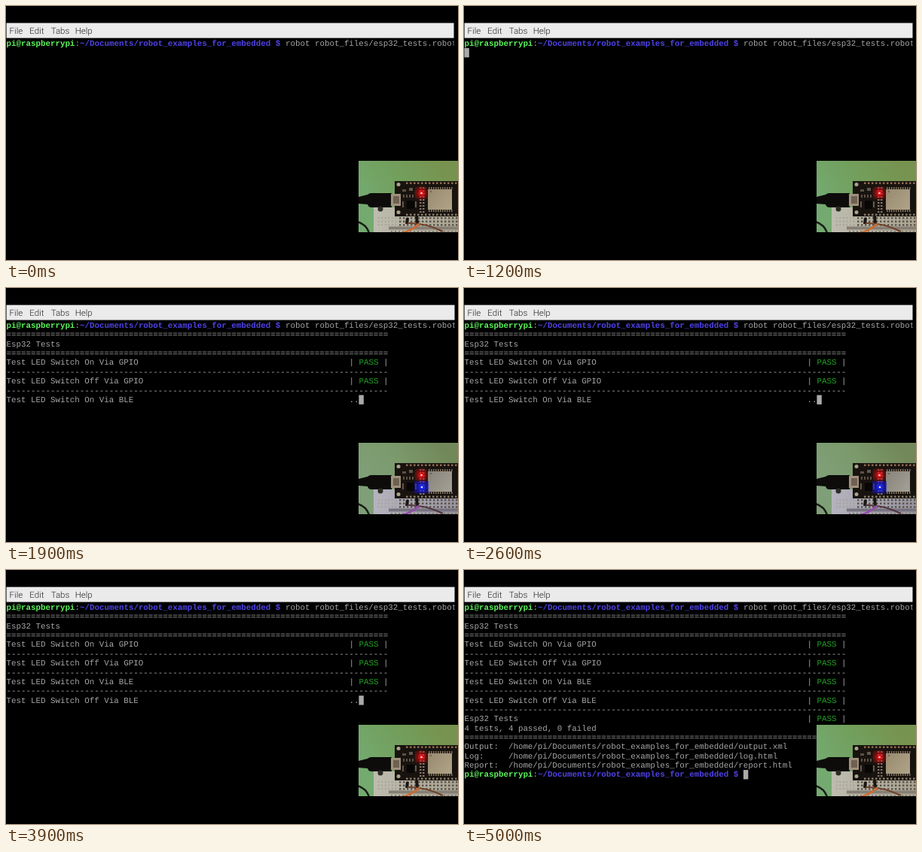
Recreate the animation shown at these times as an HTML page with a canvas. Size 600 by 338 pixels, loop 5100 ms.

```html
<!DOCTYPE html>
<html lang="en">
<head>
<meta charset="utf-8">
<title>Robot tests on an ESP32</title>
<style>
html, body { margin: 0; width: 100%; height: 100%; overflow: hidden; background: #000; }
canvas { display: block; }
</style>
</head>
<body>
<canvas id="stage" width="600" height="338"></canvas>
<script>
const ctx = document.getElementById('stage').getContext('2d');
const LOOP = 5100, CELL = 6.5, PITCH = 12.36, BASE = 53, LEFT = 0.4;
const DONE = 4500, GREY = '#a6a6a6', GREEN = '#21a324';
const tests = [
  { name: 'Test LED Switch On Via GPIO', start: 1300, end: 1500 },
  { name: 'Test LED Switch Off Via GPIO', start: 1500, end: 1700 },
  { name: 'Test LED Switch On Via BLE', start: 1700, end: 2800 },
  { name: 'Test LED Switch Off Via BLE', start: 2800, end: DONE }
];
const ledOn = t => (t >= 1400 && t < 1600) || (t >= 1800 && t < 2900);

function rect(x, y, w, h, color) {
  ctx.fillStyle = color;
  ctx.fillRect(x, y, w, h);
}

function disc(x, y, r, color) {
  ctx.fillStyle = color;
  ctx.beginPath();
  ctx.arc(x, y, r, 0, 7);
  ctx.fill();
}

function curve(path, width, color) {
  ctx.strokeStyle = color;
  ctx.lineWidth = width;
  ctx.stroke(new Path2D(path));
}

function row(x, y, count, step, w, h, color) {
  for (let i = 0; i < count; i++) rect(x + i * step, y, w, h, color);
}

function gradient(x1, y1, x2, y2, ...colors) {
  const g = ctx.createLinearGradient(x1, y1, x2, y2);
  colors.forEach((color, i) => g.addColorStop(i / (colors.length - 1), color));
  return g;
}

function glow(x, y, r, rgb, core) {
  const g = ctx.createRadialGradient(x, y, 0, x, y, r);
  g.addColorStop(0, `rgba(${rgb},1)`);
  g.addColorStop(0.25, `rgba(${rgb},.8)`);
  g.addColorStop(0.5, `rgba(${rgb},.3)`);
  g.addColorStop(1, `rgba(${rgb},0)`);
  disc(x, y, r, g);
  disc(x, y, 1.3, core);
}

function write(line, col, text, color = GREY, weight = 400) {
  ctx.font = `${weight} 10.8333px "Liberation Mono", monospace`;
  ctx.fillStyle = color;
  ctx.fillText(text, LEFT + col * CELL, BASE + line * PITCH);
}

function cursor(line, col) {
  rect(LEFT + col * CELL, BASE + line * PITCH - 9.4, 6.4, 12.4, '#aaa');
}

function prompt(line) {
  write(line, 0, 'pi@raspberrypi', '#5cf65c', 700);
  write(line, 14, ':', GREY);
  write(line, 15, '~/Documents/robot_examples_for_embedded $', '#4f43e6', 700);
}

function passed(line) {
  write(line, 70, '|      |');
  write(line, 72, 'PASS', GREEN);
}

function menu(right) {
  rect(0.6, 22.6, right, 20, '#ebebeb');
  ctx.font = '300 11.5px Roboto, sans-serif';
  ctx.fillStyle = '#222';
  [['File', 4.6], ['Edit', 31.3], ['Tabs', 59.7], ['Help', 91.7]]
    .forEach(([label, x]) => ctx.fillText(label, x, 36.7));
}

function terminal(t) {
  const double = '='.repeat(78), single = '-'.repeat(78);
  prompt(0);
  write(0, 57, 'robot robot_files/esp32_tests.robot');
  if (t < 100) return;
  if (t < 1300) return cursor(1, 0);
  write(1, 0, double);
  write(2, 0, 'Esp32 Tests');
  write(3, 0, double);
  tests.forEach(({ name, start, end }, i) => {
    const line = 4 + 2 * i;
    if (t < start) return;
    write(line, 0, name);
    if (t < end) {
      write(line, 70, '..');
      cursor(line, 72);
    } else {
      passed(line);
      write(line + 1, 0, single);
    }
  });
  if (t < DONE) return;
  write(12, 0, 'Esp32 Tests');
  passed(12);
  write(13, 0, '4 tests, 4 passed, 0 failed');
  write(14, 0, double);
  ['Output:  |output.xml', 'Log:     |log.html', 'Report:  |report.html'].forEach((text, i) =>
    write(15 + i, 0, text.replace('|', '/home/pi/Documents/robot_examples_for_embedded/')));
  prompt(18);
  cursor(18, 57);
}

function camera(on) {
  ctx.save();
  ctx.beginPath();
  ctx.rect(468, 206, 132, 95);
  ctx.clip();
  const wall = on ? ['#7f9f78', '#7b9a6c', '#72885a'] : ['#74aa70', '#729f5d', '#77934f'];
  rect(468, 206, 132, 95, gradient(476, 262, 570, 200, ...wall));

  // breadboard
  rect(488, 268, 112, 33, gradient(488, 0, 600, 0, ...(on ? ['#b5b3bd', '#98949f'] : ['#bdbcae', '#a9a391'])));
  for (let y = 281; y < 293; y += 4.6) {
    row(494, y, 6, 4.5, 1.5, 2, '#a09f96');
    row(522, y, 16, 5, 2.4, 2.4, '#58524a');
  }
  rect(508, 293.5, 92, 4, on ? '#77727f' : '#857f75');
  row(511, 299, 18, 5, 2, 2, '#847f75');

  // USB cable
  curve('M466 287 Q478 290 482 302', 2.5, '#1b1e17');
  ctx.fillStyle = '#0d0c0b';
  ctx.fill(new Path2D('M468 254 L480 251 Q482 249 485 249 H512 V268 H485 Q481 268 480 264 L468 263 Z'));
  disc(497, 270, 3.5, '#2b2d25');

  // circuit board
  rect(516, 233, 84, 47, '#18130f');
  row(531, 234.5, 14, 5, 2.5, 2.5, '#8f6b50');
  row(531, 276.5, 14, 5, 2.5, 2.5, '#877b66');
  disc(521, 237.5, 2.5, '#a8a58b');
  disc(521, 274.5, 2.5, '#a8a58b');
  rect(511, 250, 13, 16, '#9f917d');
  rect(514, 253, 8, 10, '#6f6152');
  rect(526, 244, 5, 3, '#5a5042');
  rect(535, 242, 5, 4, '#62574a');
  row(527, 251, 4, 4, 2, 4, '#5d5144');
  rect(532, 259, 10, 11, '#090706');
  row(526, 260, 2, 17, 2, 8, '#63584b');
  for (let y = 241; y < 274; y += 4) row(549, y, 2, 4, 2.5, 2, '#86756a');
  row(561, 241, 11, 3, 1.5, 3, '#847660');
  row(561, 271, 11, 3, 1.5, 3, '#847660');
  rect(560, 244, 32, 27, gradient(560, 244, 592, 271, ...(on ? ['#87837a', '#a4a196'] : ['#988a70', '#b0a488'])));
  disc(564, 247, 1, '#5c574d');

  // jumper wires
  curve('M533 282 L532 290 M545 280 L546 290', 4, '#1b1613');
  curve('M533 289 Q555 288 580 300', 2, on ? '#51343d' : '#6e4027');
  curve('M526 302 Q538 299 549 290', 2.4, on ? '#954bb1' : '#d2692f');

  if (on) {
    rect(542, 257, 19, 16, 'rgba(20,20,190,.5)');
    glow(552, 265, 11, '25,35,255', '#dce8ff');
  }
  rect(543, 241, 15, 15, 'rgba(150,15,15,.3)');
  glow(551.5, 249, 11, '245,15,20', '#ffd8d2');
  ctx.restore();
}

function draw(now) {
  const t = now % LOOP, right = t < 100 ? 594.5 : 595.5;
  rect(0, 0, 600, 338, '#000');
  ctx.textRendering = 'geometricPrecision';
  ctx.save();
  ctx.beginPath();
  ctx.rect(0, 0, right, 338);
  ctx.clip();
  menu(right);
  terminal(t);
  ctx.restore();
  camera(ledOn(t));
  requestAnimationFrame(draw);
}
requestAnimationFrame(draw);
</script>
</body>
</html>
```
